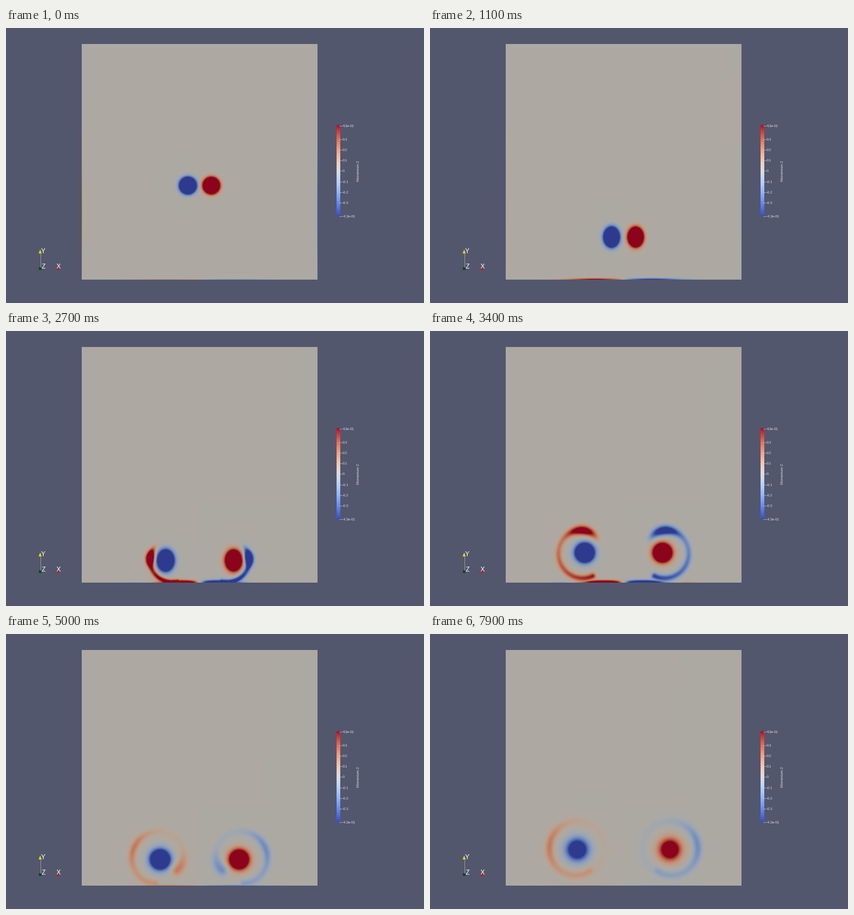
A matplotlib script that plays this animation: 679x447 px, repeating every 8000 ms.

```python
import numpy as np
import matplotlib.pyplot as plt
from matplotlib import colormaps
from matplotlib.animation import FuncAnimation
from matplotlib.colors import ListedColormap

W, H, DPI = 679, 447, 64
FRAMES, STEP = 80, 100
LEFT, RIGHT, TOP, FLOOR = 123, 505.5, 27, 409.4
MID = (LEFT + RIGHT) / 2
HALF, ROWS = 191, 382
SHEET_ROW = 250

# Left vortex centre (time, x, y); the right one is its mirror image.
PATH = np.array([
    (0, 295, 256.5), (1.1, 294.5, 340), (1.9, 286, 381), (2.7, 259, 373),
    (3.4, 251, 360.5), (4.2, 264, 366), (5, 250, 366.5), (7.9, 239, 350.5),
])
TIMES, POINTS = PATH[:, 0], PATH[:, 1:]
SPEEDS = np.gradient(POINTS, TIMES, axis=0)

gx = np.float32(LEFT + 0.5 + np.arange(HALF))[None, :]
gy = np.float32(TOP + 0.5 + np.arange(ROWS))[:, None]


def bump(x, centre, width, order=2):
    return np.exp(-np.abs((x - centre) / width) ** order)


def centre(t):
    """Cubic Hermite curve through the path points."""
    i = min(np.searchsorted(TIMES, t, "right") - 1, len(TIMES) - 2)
    h = TIMES[i + 1] - TIMES[i]
    u = (t - TIMES[i]) / h
    blend = u * u * (3 - 2 * u)
    pull = (1 - u) * SPEEDS[i] - u * SPEEDS[i + 1]
    return POINTS[i] * (1 - blend) + POINTS[i + 1] * blend + h * u * (1 - u) * pull


def core(t, cx, cy):
    """Spreading Gaussian vortex, strained each time it nears the wall."""
    size = 9.4 + 0.9 * t
    gamma = 800 * np.exp(-0.007 * t * t)
    strain = 0.27 * min(t, 1) * bump(t, 0, 6, 8)
    stretch = 1 + strain * np.cos(np.pi * (t - 1.1) / 1.55) ** 2
    r2 = (gx - cx) ** 2 * stretch + (gy - cy) ** 2 / stretch
    return gamma / size ** 2 * np.exp(-r2 / size ** 2)


def wall_layer(t):
    press = bump(t, 2.8, 1.8, 4)
    along = bump(gx, 255 + 28 * press, 60 - 29 * press)
    across = bump(gy, FLOOR, 1.5 + 2.5 * press)
    return (0.35 + 1.8 * press) * along * across * np.tanh((MID - gx) / 8)


def sheet(t, cx, cy):
    """Layer torn off the wall and wound around the core (0 = below, 90 = left)."""
    s = np.linspace(0, 1, 121)
    tail = -30 + 48 * bump(t, 4.6, 1)
    head = 340 * np.tanh((t - 1.45) / 2.5)
    ang = np.radians(tail + (head - tail) * s)
    root, mid, tip = 40, 46 - 20 * bump(t, 2.7, 0.55), 30 + 3 * max(0, t - 4.2)
    rad = (root * (1 - s) * (1 - 2 * s) + mid * 4 * s * (1 - s)
           + tip * s * (2 * s - 1))
    px = cx - rad * np.sin(ang)
    py = np.minimum(cy + rad * np.cos(ang), FLOOR - 1)

    # A fading band, a blob carried by its head and a late one at the rear
    blob = bump(s, min(1, 0.2 + 0.18 * t), 0.15)
    power = ((0.3 + 1.4 * bump(t, 2.3, 1.3)) * (1 - s)
             + 2 * min(1, np.exp((2.7 - t) / 1.6)) * blob
             + 0.28 * np.clip(t - 4, 0, 1) * bump(s, 0.36, 0.12))
    power *= np.clip((t - 1.2) / 0.7, 0, 1)
    width = (8.5 - 13 * np.exp(-t / 2)) * (0.85 + 0.35 * blob)

    y = gy[SHEET_ROW:]
    level = np.full((len(y), HALF), -20, np.float32)
    for x0, y0, p, w in zip(px, py, np.log(power + 1e-6), width):
        d2 = (gx - np.float32(x0)) ** 2 + (y - np.float32(y0)) ** 2
        np.maximum(level, np.float32(p) - d2 * np.float32(1 / w ** 2), out=level)
    return np.exp(level)


def field(t):
    cx, cy = centre(t)
    q = wall_layer(t)
    if t > 1.2:
        q[SHEET_ROW:] = np.maximum(q[SHEET_ROW:], sheet(t, cx, cy))
    q = q - core(t, cx, cy)
    # Faint traces on the side wall and further out on the floor
    q += 0.4 * np.exp(-1.5 * t) * bump(gx, LEFT, 1.3 + 3 * t) * bump(gy, 300, 95)
    q -= 0.35 * bump(t, 3.5, 1) * bump(gx, 211, 17) * bump(gy, FLOOR, 2)
    q = np.clip(q, -1, 1)
    return np.hstack([q, -q[:, ::-1]])


plt.rcParams["font.family"] = "Liberation Sans"
fig = plt.figure(figsize=(W / DPI, H / DPI), dpi=DPI, facecolor="#52576e")
ax = fig.add_axes([0, 0, 1, 1])
ax.axis("off")


def label(x, y, text, size, color="#dcdde4", **kw):
    ax.text(x, y, text, size=size * 72 / DPI, color=color, **kw)


def line(xs, ys, color, width):
    ax.plot(xs, ys, color=color, lw=width * 72 / DPI, solid_capstyle="butt")


# Cool-warm map, dimmed by the surface lighting
shaded = colormaps["coolwarm"](np.linspace(0, 1, 256))
shaded[:, :3] *= (0.783, 0.77, 0.74)
plane = ax.imshow(field(0), cmap=ListedColormap(shaded), vmin=-1, vmax=1,
                  extent=(LEFT, RIGHT, FLOOR, TOP), aspect="auto",
                  interpolation="bilinear")

# Colour bar
ax.imshow(np.linspace(1, 0, 256)[:, None], cmap="coolwarm", aspect="auto",
          extent=(537, 543, 306, 158.5), interpolation="nearest")
for value in (0.43, *np.arange(3, -4, -1) / 10, -0.43):
    y = 232.4 - 171.5 * value
    text = f"{value:.1e}" if abs(value) > 0.4 else f"{value:g}"
    line([541, 545.5], [y, y], "#c9cbd4", 0.6)
    label(547, y, text, 5.6, va="center_baseline")
label(572, 232, "Momentum Z", 5.8, rotation=90, ha="center", va="center")

# Orientation axes
line([55.5, 55.5], [366, 389], "#a3a594", 0.8)
ax.fill([53, 58, 55.5], [366.5, 366.5, 360], color="#e8e000", lw=0)
ax.fill([86, 86, 79.5], [388.5, 393.5, 391], color="#d01010", lw=0)
ax.add_patch(plt.Circle((55.5, 391), 2.4, color="#004d08", lw=0))
for x, y, name in ((60, 363.5, "Y"), (60.5, 388, "Z"), (85, 388, "X")):
    label(x, y, name, 10.5, "white", ha="center", va="center")

ax.set_xlim(0, W)
ax.set_ylim(H, 0)


def update(i):
    plane.set_data(field(i * STEP / 1000))
    return [plane]


anim = FuncAnimation(fig, update, frames=FRAMES, interval=STEP, repeat=True)
plt.show()
```
